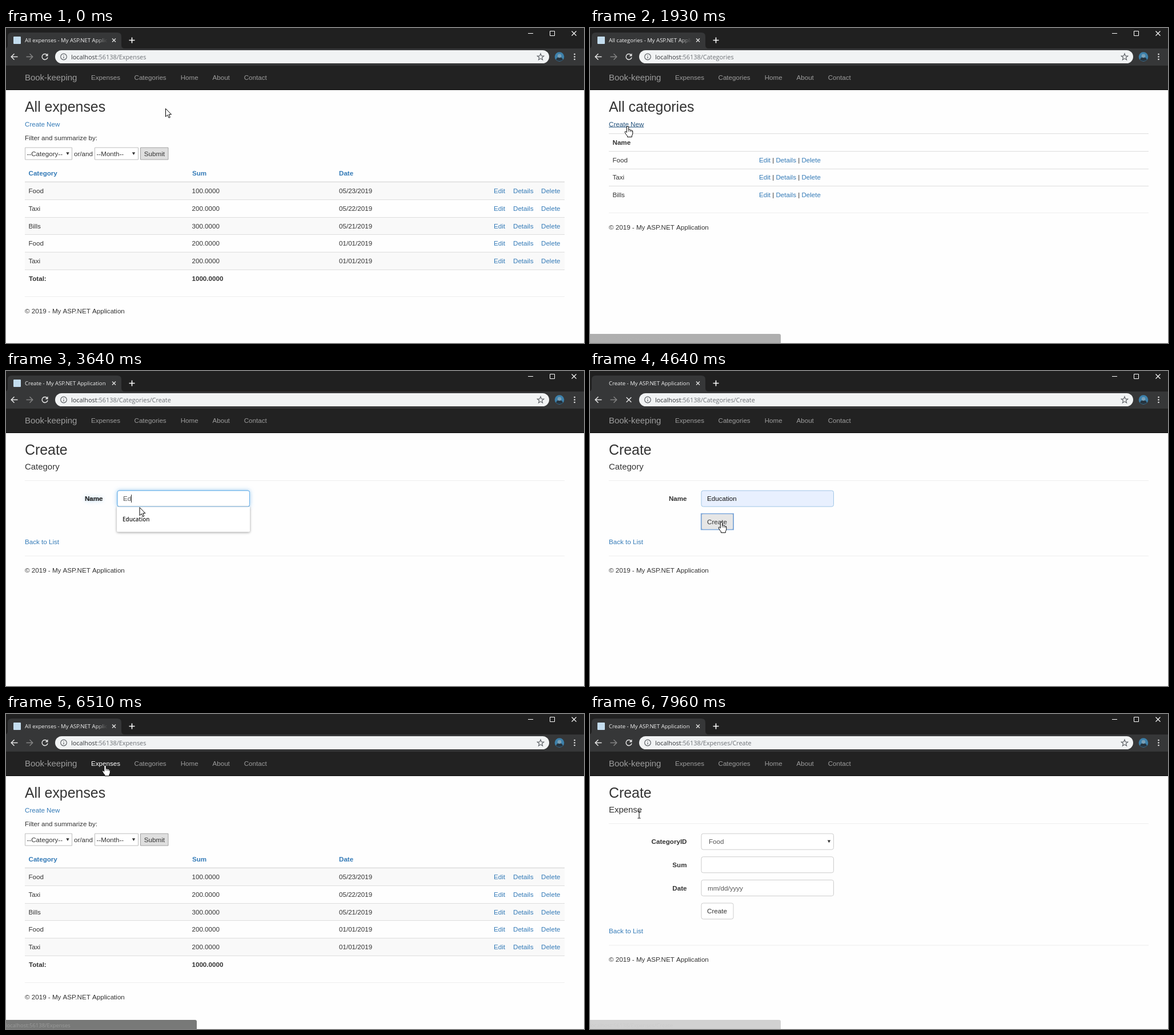
These frames come from a looping animation (1012x553 px, 8000 ms). An HTML page with a canvas:

```html
<!DOCTYPE html>
<html lang="en">
<head>
<meta charset="utf-8">
<title>Expenses walkthrough</title>
<style>
html, body { margin: 0; width: 100%; height: 100%; overflow: hidden; background: #fefefe; }
canvas { display: block; }
</style>
</head>
<body>
<canvas id="stage" width="1012" height="553"></canvas>
<script>
const c = document.getElementById('stage').getContext('2d');
const LOOP = 8000, STEP = 77.4;
const HOST = 'localhost', PORT = ':56138/';
const ARIAL = '"Liberation Sans", Arial, sans-serif';
const UI = '"Open Sans", "Noto Sans", sans-serif';
const BODY = 11.62, LEFT = 33, RIGHT = 978, ROW = 30.7;
const LINK = '#337ab7', INK = '#333', BAR = '#363738';

// ---------- drawing helpers ----------
function text(s, x, y, o = {}) {
  const size = o.size || BODY;
  c.font = `${o.weight || 400} ${size}px ${o.font || ARIAL}`;
  c.textAlign = o.align || 'left';
  c.fillStyle = o.color || INK;
  c.fillText(s, x, y + size * 0.355);
  return c.measureText(s).width;
}
const bold = (s, x, y, color, align) => text(s, x, y, { weight: 700, color, align });
const link = (s, x, y) => text(s, x, y, { color: LINK });

function rect(x, y, w, h, color) {
  c.fillStyle = color;
  c.fillRect(x, y, w, h);
}
function box(x, y, w, h, r, fill, stroke) {
  c.beginPath();
  c.roundRect(x, y, w, h, r);
  if (fill) { c.fillStyle = fill; c.fill(); }
  if (stroke) { c.strokeStyle = stroke; c.lineWidth = 1; c.stroke(); }
}
function path(d, color, width, fill) {
  const p = new Path2D(d);
  if (fill) { c.fillStyle = fill; c.fill(p); }
  if (color) { c.strokeStyle = color; c.lineWidth = width; c.stroke(p); }
}
function circle(x, y, r, fill, stroke) {
  c.beginPath();
  c.arc(x, y, r, 0, 7);
  if (fill) { c.fillStyle = fill; c.fill(); }
  if (stroke) { c.strokeStyle = stroke; c.lineWidth = 1.2; c.stroke(); }
}
const rule = (y, color = '#ddd', h = 1) => rect(LEFT, y, RIGHT - LEFT, h, color);
const cross = (x, y, r, color, w) =>
  path(`M${x - r} ${y - r}l${2 * r} ${2 * r}M${x + r} ${y - r}l${-2 * r} ${2 * r}`, color, w);
const chevron = (x, y) => path(`M${x - 2.7} ${y - 2.3}h5.4l-2.7 4.8z`, null, 0, '#333');

function withShadow(color, blur, dy, draw) {
  c.save();
  c.shadowColor = color;
  c.shadowBlur = blur;
  c.shadowOffsetY = dy;
  draw();
  c.restore();
}

// ---------- browser window ----------
function browser(scene) {
  const { path: page, title, loading } = scene;
  rect(0, 0, 1012, 37, '#202020');
  rect(0, 36, 1012, 30, BAR);
  path('M-3 36Q3 36 3 30V15Q3 8 10 8H195Q202 8 202 15V30Q202 36 208 36Z', null, 0, BAR);

  if (!loading) box(13, 15, 13, 13, 1, '#c3dcee');
  else if (!title) path('M19 16l2.5 2', '#ddd', 1.3);
  const label = title ? `${title} - My ASP.NET Application` : HOST + PORT + page;
  let color = '#f1f1f1';
  if (title.length > 6) {
    color = c.createLinearGradient(158, 0, 178, 0);
    color.addColorStop(0, '#f1f1f1');
    color.addColorStop(1, BAR);
  }
  c.save();
  c.beginPath();
  c.rect(0, 8, 178, 28);
  c.clip();
  text(label, 33, 21.3, { size: 9.55, font: UI, color });
  c.restore();
  cross(189, 21.5, 3, '#e4e4e4', 1.3);
  path('M215.5 21.5h10M220.5 16.5v10', '#fff', 1.6);

  path('M914 9.5h9M952.5 5.5h8v8h-8z', '#fff', 1);
  cross(994.5, 9.5, 4, '#fff', 1.1);

  path('M20.5 50.5h-11M14.5 45.2l-5.3 5.3 5.3 5.3', '#e4e4e4', 1.5);
  path('M35.5 50.5h11M41.5 45.2l5.3 5.3-5.3 5.3', '#858585', 1.4);
  if (loading) cross(68, 50.5, 4.3, '#e4e4e4', 1.5);
  else {
    path('M72 47.3A5 5 0 1 0 73 51.5', '#e4e4e4', 1.5);
    path('M73.5 44.5v5h-5z', null, 0, '#e4e4e4');
  }

  box(86, 39, 865, 23, 11.5, '#f1f3f4');
  circle(101, 50.5, 5.3, null, '#5f6368');
  path('M101 50v3.4M101 47.4v1.3', '#5f6368', 1.2);
  const url = { size: 10.9, font: UI, color: '#33363a' };
  const w = text(HOST, 114, 50.7, url);
  text(PORT + page, 114 + w, 50.7, { ...url, color: '#6c7075' });
  let star = '';
  for (let i = 0; i < 10; i++) {
    const a = i * Math.PI / 5, r = i % 2 ? 2.6 : 6;
    star += `${i ? 'L' : 'M'}${936 + r * Math.sin(a)} ${51 - r * Math.cos(a)}`;
  }
  path(star + 'Z', '#5f6368', 1.2);

  circle(969, 50.5, 8.3, '#3d81ab');
  path('M963 56Q964 51 969 51T975 56Q969 60 963 56Z', null, 0, '#26343f');
  circle(969, 49, 3.3, '#7a9fb5');
  for (const y of [46, 50.5, 55]) circle(995.5, y, 1.3, '#e4e4e4');
}

function navbar(hover) {
  rect(0, 66, 1012, 43, '#222');
  rect(0, 108, 1012, 1, '#080808');
  text('Book-keeping', LEFT, 87, { size: 14.94, color: '#9d9d9d' });
  const items = { Expenses: 149, Categories: 224.5, Home: 305.7, About: 361.5, Contact: 416.7 };
  for (const name in items)
    text(name, items[name], 87, { color: name === hover ? '#fff' : '#9d9d9d' });
}

// ---------- pages ----------
const heading = s => text(s, LEFT, 138, { size: 24.9 });

function footer(y) {
  rule(y, '#eee');
  text('© 2019 - My ASP.NET Application', LEFT, y + 25.7);
}
function createLink(hover) {
  const color = hover ? '#23527c' : LINK;
  const w = text('Create New', LEFT, 168.5, { color });
  if (hover) rect(LEFT, 173.5, w, 1, color);
}

function expenses(T, hover) {
  heading('All expenses');
  createLink(hover === 'new');
  text('Filter and summarize by:', LEFT, 193.3);
  box(33.5, 210, 82, 21, 0, '#fff', '#bdbdbd');
  text('--Category--', 36.5, 220.7);
  chevron(108, 220.5);
  text('or/and', 119, 220.7);
  box(155.5, 210, 76, 21, 0, '#fff', '#bdbdbd');
  text('--Month--', 158.5, 220.7);
  chevron(223.5, 220.5);
  box(235.5, 210, 48.5, 21, 0, '#dfdfdf', '#a3a3a3');
  text('Submit', 241.8, 220.7);

  bold('Category', 39.5, 255, LINK);
  bold('Sum', 326, 255, LINK);
  bold('Date', 583, 255, LINK);
  rule(269.5, '#ddd', 1.7);
  const rows = [['Food', 100, '05/23'], ['Taxi', 200, '05/22'], ['Bills', 300, '05/21'],
    ['Food', 200, '01/01'], ['Taxi', 200, '01/01']];
  rows.forEach(([name, sum, day], i) => {
    const y = 286.2 + i * ROW;
    if (i % 2 === 0) rule(y - 15, '#f9f9f9', ROW);
    text(name, 39.5, y);
    text(sum + '.0000', 325.5, y);
    text(day + '/2019', 583, y);
    link('Edit', 854, y);
    link('Details', 888, y);
    link('Delete', 937, y);
  });
  for (let i = 1; i <= 5; i++) rule(Math.round(270.3 + i * ROW));
  bold('Total:', 40, 439.7);
  bold('1000.0000', 325.5, 439.7);
  footer(471);
}

function categories(T, hover) {
  const names = ['Food', 'Taxi', 'Bills'];
  if (T > 4500) names.push('Education');
  heading('All categories');
  createLink(hover === 'new');
  rule(185);
  bold('Name', 39.5, 200.7);
  names.forEach((name, i) => {
    const y = 231.5 + i * ROW;
    rule(Math.round(y - 15.6));
    text(name, 39.5, y);
    let x = 296;
    ['Edit', ' | ', 'Details', ' | ', 'Delete'].forEach((s, k) => {
      x += k % 2 ? text(s, x, y) : link(s, x, y);
    });
  });
  footer(Math.round(232 + names.length * ROW));
}

function formHead(kind) {
  heading('Create');
  text(kind, LEFT, 167.5, { size: 14.94 });
  rule(192, '#eee');
}
function field(label, y, fill = '#fff', border = '#ccc') {
  bold(label, 169.5, y, INK, 'right');
  box(195, y - 14, 231.5, 28, 3.3, fill, border);
}
function formEnd(y) {
  link('Back to List', LEFT, y + 35);
  footer(y + 59.5);
}

function suggestions(T) {
  const items = T < 3240 ? ['Education', 'Food', 'Taxi', 'Bills'] : ['Education'];
  withShadow('rgba(0,0,0,.4)', 4, 1, () =>
    box(194, 238.5, 233, 13.3 + items.length * ROW, [0, 0, 2, 2], '#fff'));
  if (T > 3770) rect(194, 245, 233, ROW - 0.7, '#eee');
  items.forEach((s, i) =>
    text(s, 204, 260.6 + i * ROW, { size: 9.9, weight: 600, font: UI, color: '#222' }));
}

function newCategory(T) {
  const focus = T > 2620 && T < 4550, filled = T > 3770, open = T > 2770 && T < 4160;
  formHead('Category');
  const draw = () => field('Name', 224, filled ? '#e8f0fe' : '#fff',
    focus ? '#66afe9' : filled ? '#9fc5e6' : '#ccc');
  if (focus) withShadow('rgba(102,175,233,.6)', 7, 0, draw);
  draw();
  const typed = filled ? 'Education' : T > 3470 ? 'Ed' : T > 3240 ? 'E' : '';
  const w = text(typed, 205, 224, { color: filled ? '#111' : '#555' });
  if (focus && !filled) rect(Math.round(205 + w), 217, 1, 14, '#333');

  const pressed = T > 4550, over = T > 4160;
  box(195, 250.5, 56, 28, 3.3, over ? '#e6e6e6' : '#fff', over ? '#adadad' : '#ccc');
  if (pressed) {
    c.lineWidth = 1.6;
    path('M194.7 250.5h56.4v28h-56.4z', '#7ba7dc', 1.7);
  }
  text('Create', 205, 264.7);
  formEnd(264.8);
  if (open) suggestions(T);
}

function newExpense() {
  formHead('Expense');
  field('CategoryID', 224);
  text('Food', 208, 224, { color: '#555' });
  chevron(418.5, 223.7);
  field('Sum', 264.7);
  field('Date', 305.4);
  text('mm/dd/yyyy', 206, 305.4, { color: '#555' });
  box(195, 332, 56, 28, 3.3, '#fff', '#ccc');
  text('Create', 205, 346.2);
  formEnd(346);
}

// ---------- story ----------
const scene = (start, view, path, title, loading = false) => ({ start, view, path, title, loading });
const scenes = [
  scene(-99, expenses, 'Expenses', 'All expenses'),
  scene(600, expenses, 'Expenses', 'All expenses', true),
  scene(755, categories, 'Categories', '', true),
  scene(835, categories, 'Categories', 'All categories'),
  scene(2130, categories, 'Categories', 'All categories', true),
  scene(2230, newCategory, 'Categories/Create', '', true),
  scene(2300, newCategory, 'Categories/Create', 'Create'),
  scene(4620, newCategory, 'Categories/Create', 'Create', true),
  scene(4700, categories, 'Categories', '', true),
  scene(4780, categories, 'Categories', 'All categories'),
  scene(6090, categories, 'Categories', 'All categories', true),
  scene(6170, expenses, 'Expenses', '', true),
  scene(6250, expenses, 'Expenses', 'All expenses'),
  scene(7560, expenses, 'Expenses', 'All expenses', true),
  scene(7710, newExpense, 'Expenses/Create', '', true),
  scene(7790, newExpense, 'Expenses/Create', 'Create'),
];

// fade-in start, fade-out start, link
const hints = [
  [400, 950, 'Categories'],
  [1850, 2290, 'Categories/Create'],
  [5960, 6420, 'Expenses'],
  [7160, 7827, 'Expenses/Create'],
];
// start, end, hovered link
const hovers = [
  [370, 755, 'Categories'], [1740, 2230, 'new'], [5860, 6640, 'Expenses'], [7200, 7710, 'new'],
];
// time, x, y
const moves = [
  [0, 279.5, 141.5], [400, 250.5, 89.5], [766, 250.5, 89.5], [844, 247, 114],
  [1770, 66, 172.5], [2200, 66, 172.5], [2540, 240, 224], [3240, 240, 226],
  [3630, 234, 239.5], [3860, 230, 256.5], [4180, 230, 256.5], [4570, 230, 265],
  [5270, 230, 266], [5890, 173.5, 90], [6500, 173.5, 90], [7280, 62, 166],
  [7640, 62, 166], [7960, 86, 177],
];
// start, pointer shape
const pointers = [
  [-99, 'arrow'], [370, 'hand'], [835, 'arrow'], [1740, 'hand'], [2230, 'arrow'],
  [2460, 'beam'], [3240, 'none'], [3600, 'arrow'], [4160, 'hand'], [4700, 'arrow'],
  [5860, 'hand'], [6640, 'arrow'], [7200, 'hand'], [7710, 'beam'],
];
const shapes = {
  arrow: 'M0 0V14.2L3.3 11.2 5.6 16.2 7.8 15.3 5.6 10.3H10Z',
  hand: 'M-1.7 1.6Q-1.7 0 0 0T1.7 1.6V6Q3.6 5.2 4.5 6.6 6.2 6 7 7.6 8.8 7.2 8.8 9.3V12.6' +
    'Q8.8 14.6 7.3 16.4V18.8H-.6V17Q-3.2 14.4-4.8 10.8-5.2 9-3.6 9L-1.7 10.8Z',
  beam: 'M-2.5-6H-.7L0-5.4.7-6H2.5M0-5.4V5.4M-2.5 6H-.7L0 5.4.7 6H2.5',
};

const last = (list, T, key) => list.filter(e => e[key] <= T).pop();
const clamp = v => Math.max(0, Math.min(1, v));

function pointer(T) {
  const shape = last(pointers, T, 0)[1];
  if (shape === 'none') return;
  const i = Math.max(0, moves.findLastIndex(m => m[0] <= T));
  const a = moves[i], b = moves[i + 1] || a;
  let k = b === a ? 0 : clamp((T - a[0]) / (b[0] - a[0]));
  k = k * k * (3 - 2 * k);
  c.save();
  c.translate(a[1] + (b[1] - a[1]) * k, a[2] + (b[2] - a[2]) * k);
  c.lineJoin = 'round';
  path(shapes[shape], '#000', 1, shape === 'beam' ? null : '#fff');
  if (shape === 'hand') path('M1.7 6V9.5M4.5 6.8V9.8M7 7.8V10', '#000', 0.8);
  c.restore();
}

function statusBar(T) {
  const hint = last(hints, T, 0);
  if (!hint) return;
  const alpha = Math.min(clamp((T - hint[0]) / 230), clamp(1 - (T - hint[1]) / 170));
  if (alpha <= 0) return;
  c.save();
  c.globalAlpha = alpha;
  box(-4, 537, 338, 20, 3, '#121412');
  text(HOST + PORT + hint[2], -1, 546.3, { size: 9.45, font: UI, color: '#b4b4b4' });
  c.restore();
}

function render(t) {
  // the screen refreshes in even ticks
  const T = 70 + STEP * Math.floor((t - 60) / STEP);
  const now = last(scenes, T, 'start');
  const over = hovers.find(h => T >= h[0] && T < h[1]);
  const hover = over && over[2];
  rect(0, 0, 1012, 553, '#fefefe');
  browser(now);
  navbar(hover);
  now.view(T, hover);
  statusBar(T);
  pointer(T);
}

const began = performance.now();
function tick() {
  render((performance.now() - began) % LOOP);
  requestAnimationFrame(tick);
}
tick();
</script>
</body>
</html>
```
